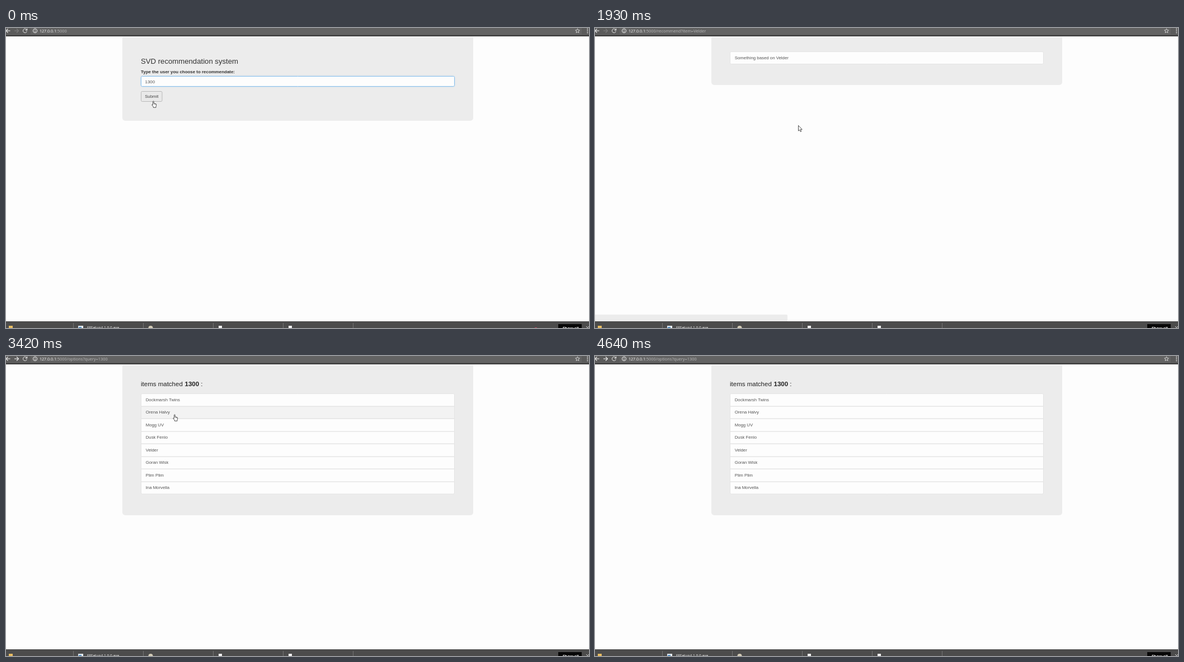
Recreate the animation shown at these times as an HTML page with a canvas. Size 1042x537 px, loop 5210 ms.

```html
<!DOCTYPE html>
<html lang="en">
<head>
<meta charset="utf-8">
<title>SVD recommendation system</title>
<style>
html, body { margin: 0; width: 100%; height: 100%; overflow: hidden; background: #fdfdfd; }
canvas { display: block; }
</style>
</head>
<body>
<canvas id="stage" width="1042" height="537"></canvas>
<script>
const ctx = document.getElementById('stage').getContext('2d');
const LOOP = 5210;
const SANS = '"Liberation Sans", Arial, sans-serif';
const UI = '"Open Sans", "Noto Sans", sans-serif';
const ITEMS = ['Dockmarsh Twins', 'Orena Halvy', 'Mogg UV', 'Dusk Fenlo',
  'Velder', 'Goran Wisk', 'Plim Plim', 'Ina Morvella'];
const ROW = 22.5, LIST_TOP = 67;

// start time, page, cursor kind, cursor x, cursor y, extra state
const STEPS = [
  [0, 'form', 'hand', 260, 130, { dot: true }],
  [130, 'form', 'hand', 259, 127, { dot: true, caret: true }],
  [250, 'form', 'hand', 258, 124, { dot: true, caret: true }],
  [400, 'form', 'hand', 259, 122, { pressed: true }],
  [550, 'list', 'hand', 267, 127],
  [680, 'list', 'arrow', 646, 269],
  [1360, 'list', 'hand', 595, 239, { hover: 7 }],
  [1510, 'list', 'hand', 255, 200, { hover: 5 }],
  [1630, 'list', 'hand', 411, 182, { hover: 5 }],
  [1780, 'list', 'hand', 396, 179, { hover: 4 }],
  [1930, 'result', 'arrow', 363, 174, { item: 4, status: true }],
  [2050, 'result', 'arrow', 160, 90, { item: 4 }],
  [2180, 'result', 'arrow', 20, 25, { item: 4 }],
  [2330, 'result', 'arrow', 1, 16, { item: 4 }],
  [2480, 'result', 'arrow', 3, 9, { item: 4, back: true }],
  [2610, 'result', 'arrow', 4, 8, { item: 4, back: true }],
  [2730, 'result', 'arrow', 3, 7, { item: 4, back: true }],
  [2880, 'list', 'arrow', 17, 13, { forward: true, back: true }],
  [3000, 'list', 'arrow', 17, 13, { forward: true }],
  [3150, 'list', 'arrow', 214, 76, { forward: true }],
  [3270, 'list', 'hand', 382, 132, { forward: true, hover: 2 }],
  [3420, 'list', 'hand', 298, 104, { forward: true, hover: 1 }],
  [3540, 'result', 'arrow', 166, 62, { item: 1, status: true }],
  [3660, 'result', 'arrow', 66, 26, { item: 1 }],
  [3820, 'result', 'arrow', 12, 14, { item: 1 }],
  [3970, 'result', 'arrow', 6, 10, { item: 1, back: true }],
  [4090, 'result', 'arrow', 3, 8, { item: 1, back: true }],
  [4240, 'list', 'arrow', 2, 8, { forward: true, back: true }],
  [4520, 'list', 'arrow', 1034, 526, { forward: true }],
  [4640, 'list', 'none', 0, 0, { forward: true }]
];

const CURSORS = {
  arrow: new Path2D('M.5 .5V10.2L2.7 8.2L4.2 11.7L5.8 11L4.3 7.6H7.2Z'),
  hand: new Path2D('M2.6 7.5V1.4Q3.4 .1 4.2 1.4V5L5.8 5.2L7.2 5.6L8.6 6.3' +
    'Q9 8.5 8 10.4V12.3H3.4V11L.7 7.6Q.8 6.3 2.6 7.5Z')
};

function text(str, x, y, size, color, weight = '', family = SANS) {
  ctx.font = `${weight} ${size}px ${family}`;
  ctx.fillStyle = color;
  ctx.fillText(str, x, y);
}

function rect(x, y, w, h, fill) {
  ctx.fillStyle = fill;
  ctx.fillRect(x, y, w, h);
}

function box(x, y, w, h, radius, fill, stroke) {
  ctx.beginPath();
  ctx.roundRect(x, y, w, h, radius);
  ctx.fillStyle = fill;
  ctx.fill();
  if (!stroke) return;
  ctx.strokeStyle = stroke;
  ctx.stroke();
}

function line(color, width, ...points) {
  ctx.beginPath();
  for (let i = 0; i < points.length; i += 2) ctx.lineTo(points[i], points[i + 1]);
  ctx.strokeStyle = color;
  ctx.lineWidth = width;
  ctx.stroke();
  ctx.lineWidth = 1;
}

function ring(x, y, r, from = 0, to = 7) {
  ctx.beginPath();
  ctx.arc(x, y, r, from, to);
  ctx.strokeStyle = '#eee';
  ctx.stroke();
}

function disc(x, y, r, color) {
  ctx.beginPath();
  ctx.arc(x, y, r, 0, 7);
  ctx.fillStyle = color;
  ctx.fill();
}

function navArrow(tip, tail, color) {
  const wing = tip + Math.sign(tail - tip) * 3.5;
  line(color, 1.1, tip, 5, tail, 5);
  line(color, 1.1, wing, 1.5, tip, 5, wing, 8.5);
}

function star(x, y) {
  const points = [];
  for (let i = 0; i <= 10; i++) {
    const a = i * Math.PI / 5 - Math.PI / 2, r = i % 2 ? 1.9 : 4;
    points.push(x + r * Math.cos(a), y + r * Math.sin(a));
  }
  line('#ddd', 0.9, ...points);
}

function toolbar(path, state) {
  rect(0, 0, 1042, 13, '#5b5b5b');
  rect(44, 0, 985, 11.5, '#636363');
  rect(0, 13, 1042, 2, '#3b3b3b');
  if (state.back) {
    ctx.save();
    ctx.beginPath();
    ctx.rect(0, 0, 44, 13);
    ctx.clip();
    disc(3, 5, 9, '#747474');
    ctx.restore();
  }
  navArrow(0, 7.5, '#eee');
  navArrow(22.5, 15, state.forward ? '#eee' : '#7c7c7c');
  ring(34, 5, 3.4, 0.3, 5.6);
  line('#eee', 1.2, 37.5, 1, 37.5, 4, 34.7, 4);
  ring(52, 5, 3.6);
  rect(51.5, 4.5, 1, 2.8, '#eee');
  rect(51.5, 2.6, 1, 1, '#eee');
  text('127.0.0.1', 60, 7.8, 7.1, '#fff', '', UI);
  text(':5000' + path, 89.8, 7.8, 7.4, '#bababa', '', UI);
  star(1021.5, 5.2);
  for (const y of [1, 4.3, 7.6]) rect(1038.5, y, 1.7, 1.7, '#e4e4e4');
}

function downloads(state) {
  rect(0, 525, 1042, 12, '#4c4c4c');
  for (let x = 120; x <= 620; x += 125) rect(x, 528, 1, 9, '#747474');
  rect(5, 533, 7, 4, '#e8bd62');
  rect(129, 533, 9, 4, '#e9eef3');
  rect(130, 535, 5, 2, '#5b93c4');
  disc(258.5, 537, 4, '#d4cdb8');
  rect(380, 533, 6, 4, '#f4f4f4');
  rect(505, 533, 6, 4, '#f4f4f4');
  text('FFSetup4.1.0.0.exe', 145, 539, 6.6, '#f4f4f4', '', UI);
  text('sample_archive_data.zip', 20, 541.5, 7, '#bbb', '', UI);
  text('Recommendation_list.txt', 270, 541.5, 7, '#bbb', '', UI);
  text('sample_notes_file.txt', 393, 541.5, 7, '#bbb', '', UI);
  text('sample_chart_table.csv', 518, 541.5, 7, '#bbb', '', UI);
  if (state.dot) rect(945, 536, 4, 1, '#b94a62');
  rect(987, 530, 42, 7, '#070707');
  text('Show all', 995, 539.5, 7, '#fff', 'bold', UI);
  line('#ddd', 1, 1037, 534, 1042, 539);
  line('#ddd', 1, 1042, 534, 1037, 539);
}

function panel(bottom) {
  box(208, 16, 627, bottom - 16, [0, 0, 5, 5], '#ececec');
}

const PAGES = {
  form(state) {
    panel(166);
    text('SVD recommendation system', 241, 64.3, 13.16, '#333');
    text('Type the user you choose to recommendate:', 241, 80.8, 7.93, '#333', 'bold');
    ctx.shadowColor = 'rgba(102,175,233,.4)';
    ctx.shadowBlur = 3;
    box(241.5, 86.5, 560, 18, 2, '#fdfdfd');
    ctx.shadowBlur = 0;
    box(241.5, 86.5, 560, 18, 2, '#fdfdfd', '#86bfec');
    text('1300', 248.5, 98.6, 7.9, '#555');
    if (state.caret) rect(267, 91, 1, 10, '#444');
    box(241.5, 113.5, 37.5, 18, 2, state.pressed ? '#d8d8d8' : '#e9e9e9', '#b9b9b9');
    text('Submit', 248.2, 125.4, 7.75, '#444');
    return '/';
  },
  list(state) {
    panel(285);
    text('items matched', 241, 54, 11.5, '#222');
    text('1300', 319.5, 54, 11.5, '#222', 'bold');
    text(':', 348.2, 54, 11.5, '#222');
    box(241.5, LIST_TOP + 0.5, 560, ROW * 8 - 0.5, 2, '#fdfdfd', '#e4e4e4');
    ITEMS.forEach((name, i) => {
      const y = Math.round(LIST_TOP + i * ROW);
      if (state.hover === i) rect(242, y, 559, ROW, '#f3f3f3');
      if (i) rect(242, y - 0.5, 559, 1.2, '#e0e0e0');
      text(name, 249.7, LIST_TOP + i * ROW + 13.9, 7.78, '#555');
    });
    return '/options?query=1300';
  },
  result(state) {
    const name = ITEMS[state.item];
    panel(102);
    box(241.5, 42.5, 560, 22, 2, '#fdfdfd', '#e4e4e4');
    text('Something based on ' + name, 249.7, 56.2, 7.83, '#555');
    if (state.status) box(0, 513, 344, 12, [0, 2, 0, 0], '#ececec');
    return '/recommend?item=' + encodeURIComponent(name);
  }
};

function cursor(kind, x, y) {
  const shape = CURSORS[kind];
  if (!shape) return;
  ctx.save();
  ctx.translate(x, y);
  ctx.fillStyle = '#fff';
  ctx.fill(shape);
  ctx.strokeStyle = '#333';
  ctx.lineWidth = 0.85;
  ctx.stroke(shape);
  if (kind === 'hand') {
    line('#333', 0.6, 5.6, 5.3, 5.6, 7.2);
    line('#333', 0.6, 7.1, 5.7, 7.1, 7.4);
  }
  ctx.restore();
}

function draw(now) {
  const time = now % LOOP;
  const [, page, kind, x, y, state = {}] = STEPS.findLast(step => step[0] <= time);
  rect(0, 0, 1042, 537, '#fdfdfd');
  const path = PAGES[page](state);
  toolbar(path === '/' ? '' : path, state);
  downloads(state);
  cursor(kind, x, y);
}

const start = performance.now();
function tick() {
  draw(performance.now() - start);
  requestAnimationFrame(tick);
}
tick();
</script>
</body>
</html>
```
